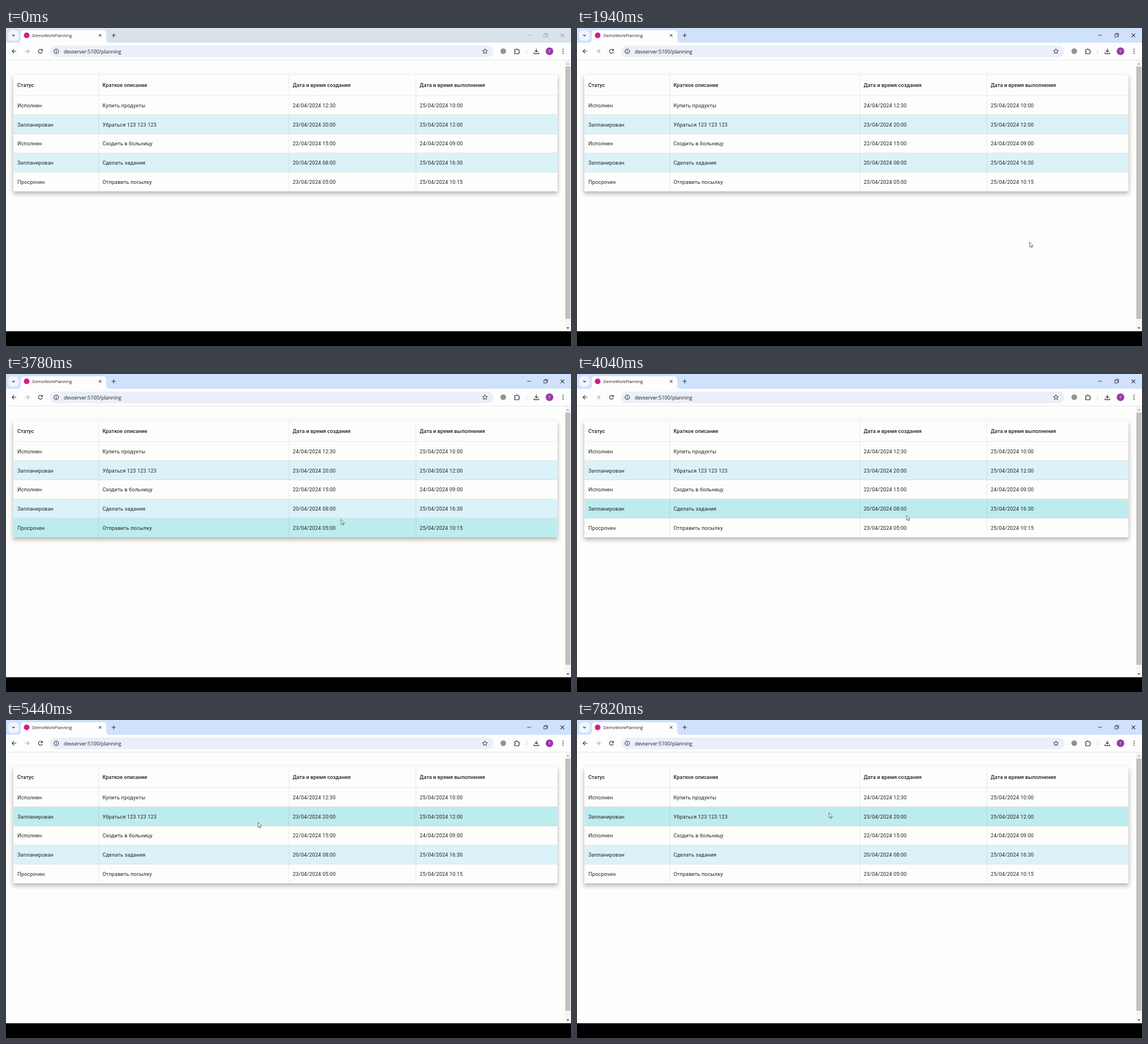
These frames come from a looping animation (998x561 px, 8 s). An HTML page:

```html
<!DOCTYPE html>
<html lang="ru">
<head>
<meta charset="utf-8">
<title>Planning</title>
<style>
html, body { margin: 0; width: 100%; height: 100%; overflow: hidden; background: #fdfdfc; }
#card {
  position: absolute; left: 13.4px; top: 83px; width: 960.2px; height: 205.4px; background: #fdfdfc;
  box-shadow: 0 3.2px 3.2px -2px rgba(0,0,0,.2), 0 5.2px 6.5px .6px rgba(0,0,0,.14), 0 2px 9px 1.3px rgba(0,0,0,.12);
}
svg { position: absolute; left: 0; top: 0; display: block; }
#table text { font: 9.1px Roboto, sans-serif; letter-spacing: .01786em; fill: #212121; }
#table .head { font-weight: 500; letter-spacing: .0071em; }
.ui { font-family: "Open Sans", sans-serif; fill: #1f1f1f; }
.icon { fill: none; stroke: #303236; stroke-width: 1.1; }
</style>
</head>
<body>
<div id="card"></div>
<svg width="998" height="561" viewBox="0 0 998 561">
  <defs>
    <path id="arrow" d="M4 0h-7.5m3.6-3.6L-3.5 0l3.6 3.6"/>
    <path id="plus" d="M-3.5 0h7M0-3.5v7"/>
  </defs>
  <rect id="strip" width="998" height="27"/>
  <rect x="4" y="4" width="18.5" height="18.5" rx="6" fill="#f0f5fd"/>
  <path d="M20 26q6 0 6-6V10q0-6 6-6h139q6 0 6 6v10q0 6 6 6Z" fill="#fdfdfd"/>
  <rect y="26" width="998" height="30.5" fill="#fdfdfd"/>
  <rect y="56" width="998" height="1" fill="#e2e7ee"/>
  <rect x="78" y="31" width="783" height="20.5" rx="10.2" fill="#eaeff9"/>
  <circle cx="36.5" cy="13" r="5" fill="#d81b8c"/>
  <text class="ui" x="46.5" y="16" font-size="7.5">DemoWorkPlanning</text>
  <text class="ui" x="102" y="44.5" font-size="8.8">devserver:5100/planning</text>

  <g class="icon">
    <path d="M11 12l2.2 2.2 2.2-2.2"/>
    <use href="#plus" transform="translate(166.3 13) rotate(45) scale(.9)"/>
    <use href="#plus" x="190.2" y="13"/>
    <use href="#arrow" x="14.2" y="41"/>
    <use href="#arrow" transform="translate(37.5 41) scale(-1 1)" stroke="#a9abae"/>
    <path d="M63.8 39a3.5 3.5 0 1 0 .5 3M64.4 37v2.6h-2.6"/>
    <circle cx="88.8" cy="41.2" r="3.9"/>
    <path d="M88.8 40.5v3m0-5v1"/>
    <path id="star" stroke-width=".9"/>
    <path d="M898.3 38.2h2.5a1.3 1.3 0 0 1 2.6 0H906v2.3a1.3 1.3 0 0 1 0 2.6v2.4h-7.7v-2.4a1.3 1.3 0 0 0 0-2.6Z"/>
    <path d="M936.8 36.5v6m-2.8-2.8l2.8 2.8 2.8-2.8M932.7 43v2.4h8.2V43"/>
    <path d="M919.5 37v8.5" stroke="#c5d8f5"/>
    <path d="M984 37.5V45" stroke-width="1.9" stroke-linecap="round" stroke-dasharray="0 3.5"/>
  </g>
  <circle cx="878.3" cy="41" r="5" fill="#929292"/>
  <circle cx="960" cy="41" r="6.7" fill="#9c35ad"/>
  <text class="ui" x="960" y="43.7" font-size="7" text-anchor="middle" style="fill:#fff">T</text>
  <g id="caption" fill="none" stroke-width=".8">
    <path d="M920.5 12.8h7M950 11h5v5h-5Zm1.7 0V9.5h5v5H955"/>
    <use href="#plus" transform="translate(982.8 13) rotate(45) scale(1.25)"/>
  </g>

  <rect x="987" y="57" width="11" height="478" fill="#f5f5f5"/>
  <rect x="988" y="68" width="9" height="445" fill="#c1c1c1"/>
  <path d="M990 64.5h5l-2.5-3Z" fill="#a3a3a3"/>
  <path d="M990 528h5l-2.5 3Z" fill="#505050"/>
  <g id="table"></g>
  <rect y="535" width="998" height="26"/>
  <path id="cursor" d="M0 0v9l2-2 1.4 3.2 1.4-.6-1.3-3.1h2.7Z" fill="#fff" stroke="#333" stroke-width=".7"/>
</svg>
<script>
const LOOP = 8000, ACTIVATE = 1240;
const LEFT = 13.4, RIGHT = 973.6, TOP = 83, BODY = 119.4, ROW = 33.8, PAD = 6.7;
const columns = [20, 170.4, 506.5, 730.8];
const headings = ['Статус', 'Краткое описание', 'Дата и время создания', 'Дата и время выполнения'];
const rows = [
  ['Исполнен', 'Купить продукты', '24/04/2024 12:30', '25/04/2024 10:00'],
  ['Запланирован', 'Убраться 123 123 123', '23/04/2024 20:00', '25/04/2024 12:00'],
  ['Исполнен', 'Сходить в больницу', '22/04/2024 15:00', '24/04/2024 09:00'],
  ['Запланирован', 'Сделать задания', '20/04/2024 08:00', '25/04/2024 16:30'],
  ['Просрочен', 'Отправить посылку', '23/04/2024 05:00', '25/04/2024 10:15']
];

// Pointer stops; it glides evenly from each to the next
const stops = [
  { t: 1680, x: 821, y: 396 },
  { t: 1940, x: 799.7, y: 377.7 },
  { t: 2780, x: 620.5, y: 273.7 },
  { t: 3100, x: 598, y: 261 },
  { t: 3620, x: 598, y: 261 },
  { t: 4040, x: 582.2, y: 249.2 },
  { t: 4500, x: 520.2, y: 219 },
  { t: 5440, x: 445.2, y: 180.7 },
  { t: 6040, x: 441, y: 158 },
  { t: 7820, x: 445.2, y: 163.7 }
];

const $ = id => document.getElementById(id);
const rowY = i => BODY + i * ROW;
const cells = (list, y, cls = '') =>
  list.map((s, i) => `<text class="${cls}" x="${columns[i]}" y="${y}">${s}</text>`).join('');

function buildTable() {
  const bands = rows.map((_, i) =>
    `<rect class="band" x="${LEFT}" y="${rowY(i)}" width="${RIGHT - LEFT}" height="${ROW}"/>`);
  const across = rows.map((_, i) => `M${LEFT} ${rowY(i) - .3}H${RIGHT}`);
  const down = columns.slice(1).map(x => `M${x - PAD} ${TOP}V${rowY(rows.length)}`);
  $('table').innerHTML = bands.join('') +
    `<path d="${across.concat(down).join('')}" stroke="#000" stroke-width=".65" stroke-opacity=".13"/>` +
    cells(headings, 104.4, 'head') +
    rows.map((row, i) => cells(row, rowY(i) + 20.4)).join('');
}

function buildStar() {
  const points = Array.from({ length: 10 }, (_, i) => {
    const a = i * Math.PI / 5, r = i % 2 ? 2 : 4.7;
    return `${846 + r * Math.sin(a)} ${41.3 - r * Math.cos(a)}`;
  });
  $('star').setAttribute('d', `M${points.join('L')}Z`);
}

function pointer(t) {
  const i = stops.findIndex(s => s.t > t);
  if (i < 0) return stops[stops.length - 1];
  const b = stops[i], a = stops[i - 1] || b;
  const k = a === b ? 0 : (t - a.t) / (b.t - a.t);
  return { x: a.x + (b.x - a.x) * k, y: a.y + (b.y - a.y) * k };
}

function draw() {
  const t = performance.now() % LOOP, active = t >= ACTIVATE;
  const { x, y } = pointer(t);
  const hovered = active ? Math.floor((y - BODY) / ROW) : -1;
  $('strip').setAttribute('fill', active ? '#d0e1fb' : '#dae2e9');
  $('caption').setAttribute('stroke', active ? '#222' : '#999da3');
  $('cursor').style.display = active ? '' : 'none';
  $('cursor').setAttribute('transform', `translate(${x} ${y})`);
  bandNodes.forEach((band, i) =>
    band.setAttribute('fill', i === hovered ? '#bdecee' : i % 2 ? '#dbf2f9' : '#fdfdfc'));
  requestAnimationFrame(draw);
}

buildTable();
buildStar();
const bandNodes = document.querySelectorAll('.band');
draw();
</script>
</body>
</html>
```
